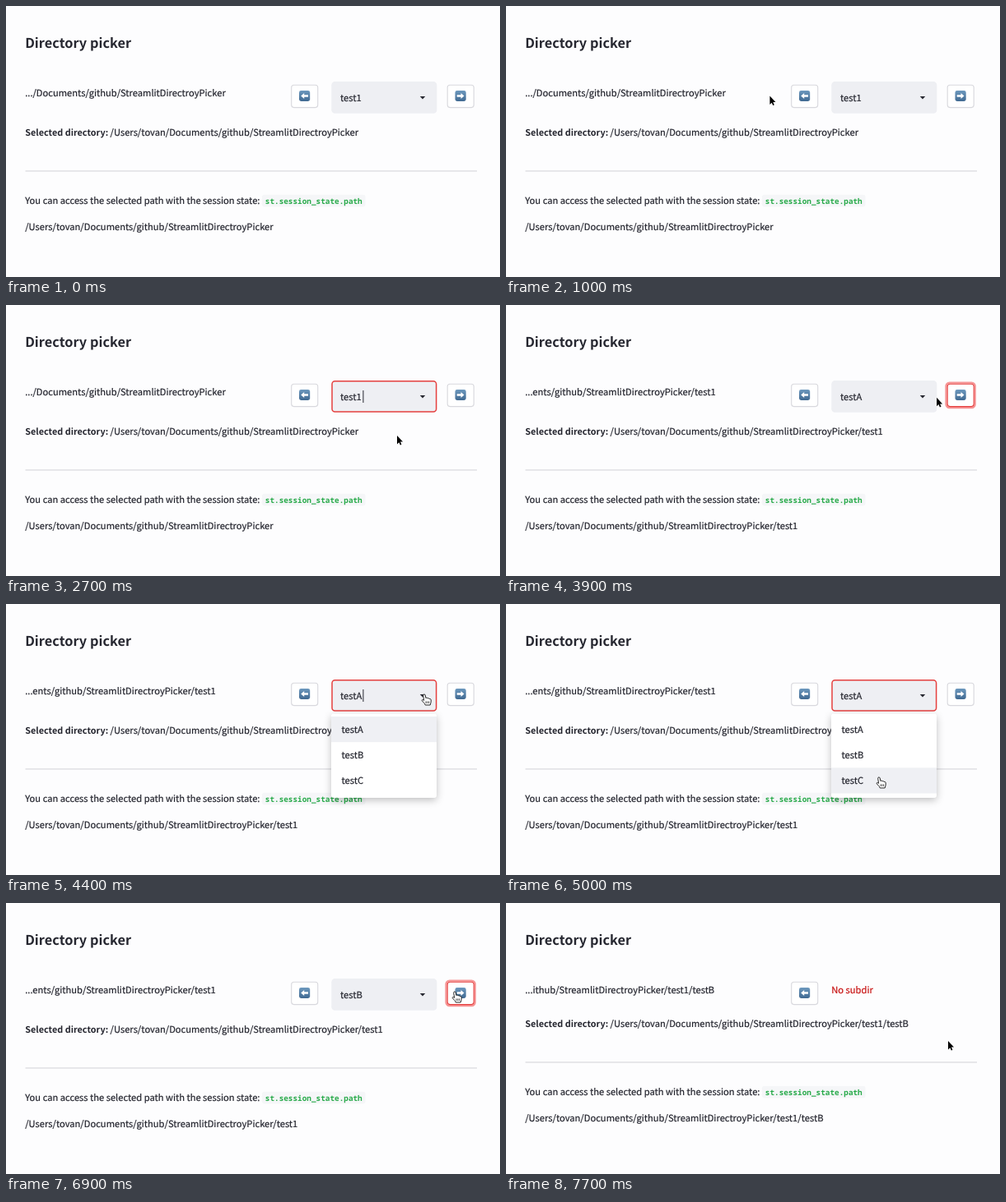
Write an HTML page that moves like this. It is 600 px wide and 330 px high and loops after 8 s.

```html
<!DOCTYPE html>
<html lang="en">
<head>
<meta charset="utf-8">
<title>Directory picker</title>
<style>
  html, body { margin: 0; width: 100%; height: 100%; overflow: hidden; background: #fdfdfe; }
  svg { display: block; width: 100vw; height: 100vh; }
  text {
    font: 11.16px "Noto Sans CJK JP", "Noto Sans CJK SC", "Noto Sans", sans-serif;
    fill: #262730; stroke: #262730; stroke-width: .22px;
    white-space: pre; text-rendering: geometricPrecision;
  }
  .bold, .title, .code { font-weight: 600; stroke: none; }
  .bold { font-size: 10.85px; }
  .title { font-size: 16.35px; }
  .code { font-family: "Noto Sans Mono", "DejaVu Sans Mono", monospace; font-size: 9.37px; fill: #28aa4a; }
  .warn { fill: #c81414; stroke: #c81414; }
  .menu { filter: drop-shadow(0 3px 5px rgba(0, 0, 0, .24)); }
</style>
</head>
<body>
<svg viewBox="0 0 600 330">
  <defs>
    <linearGradient id="key" x2="0" y2="1">
      <stop stop-color="#6c98bd"/><stop offset="1" stop-color="#416a92"/>
    </linearGradient>
  </defs>
  <g id="stage"></g>
</svg>
<script>
const LOOP = 8000, STEP = 100, ROW = 31.2, RED = '#e5403f', INK = '#262730';
const stage = document.getElementById('stage');

const home = '/Users/tovan/Documents/github/StreamlitDirectroyPicker';
const pages = [
  { path: home, items: ['test1', 'test2'] },
  { path: home + '/test1', items: ['testA', 'testB', 'testC'] },
  { path: home + '/test1/testB' }
];

// Pointer moves: start, duration, destination
const next = [551, 118], arrow = [508, 110];
const moves = [
  [1000, 300, next], [1300, 100, arrow],
  [2000, 300, [470, 182]], [2300, 300, [475, 159]],
  [2900, 200, next], [3600, 500, arrow],
  [4500, 500, [453, 211]], [5100, 200, [455, 187]],
  [6300, 300, [545, 108]], [7400, 300, [537, 168]]
];

const within = (v, a, b) => v >= a && v < b;
const clamp = (v, a, b) => Math.max(a, Math.min(b, v));
const text = (x, y, s, cls = '') => `<text x="${x}" y="${y}" class="${cls}">${s}</text>`;
const rect = (x, y, w, h, r, fill, more = '') =>
  `<rect x="${x}" y="${y}" width="${w}" height="${h}" rx="${r}" fill="${fill}" ${more}/>`;

function pointerAt(t) {
  // One sweep around the controls, then the moves in turn
  const angle = Math.PI * (.5 - 4 / 3 * clamp((t - 200) / 600, 0, 1));
  let x = 433 + 130 * Math.cos(angle), y = 157 + 95 * Math.sin(angle);
  for (const [start, span, [toX, toY]] of moves) {
    const k = clamp((t - start) / span, 0, 1), ease = k * k * (3 - 2 * k);
    x += (toX - x) * ease;
    y += (toY - y) * ease;
  }
  return [x, y];
}

function button(x, dir, hover, focus) {
  const edge = hover || focus ? RED : '#d8d8dd';
  const ring = focus ? rect(x - 1.2, 94.6, 35, 30.4, 4, 'none', 'stroke="#f69494" stroke-width="2.4"') : '';
  return ring + rect(x + .4, 96.2, 32, 27.4, 3, '#fff', `stroke="${edge}" stroke-width="1.1"`) +
    `<g transform="translate(${x + 16.3} 109.5) scale(${dir} 1)">` +
    rect(-6.6, -6.4, 13.2, 12.8, 2.4, 'url(#key)') +
    '<path d="M-4.4 0L-.4-3.4V-1.3H4.4V1.3H-.4V3.4Z" fill="#fff"/></g>';
}

function select(value, focus, caret) {
  return rect(396, 92.7, 126.6, 37.4, 3.5, '#eeeff3', `stroke="${focus ? RED : '#eeeff3'}" stroke-width="1.5"`) +
    text(406, 115.6, value) + `<path d="M502.8 110H509.2L506 113.4Z" fill="${INK}"/>` +
    (caret ? rect(433.4, 104, 1, 15, 0, INK) : '');
}

function menu(items, y) {
  const active = clamp(Math.floor((y - 137) / ROW), 0, items.length - 1);
  return `<g class="menu">${rect(395, 133.5, 128, 9 + ROW * items.length, 3, '#fff')}</g>` +
    rect(395, 137 + ROW * active, 128, ROW, 0, '#eff0f4') +
    items.map((s, i) => text(407.5, 157 + ROW * i, s)).join('');
}

function pointer([x, y], hand) {
  const shape = hand
    ? '<path d="M-1.3 1.2C-1.3-.4 .9-.5 1.2 1L1.9 4.6C2.6 3.8 3.9 4 4.1 5C4.9 4.4 6 4.7 6.2 5.6C7.3 5.1 8.2 5.8 8.2 7V9C8.2 10.6 7.4 11.2 7.2 13H1.2C1 11.2-1.6 9.4-2.6 7.8C-3.4 6.5-1.6 6-.4 7.4Z" fill="#fff" stroke="#111" stroke-width=".9"/>' +
      '<path d="M2 8.4V11M3.8 8.4V11M5.6 8.4V11" stroke="#111" stroke-width=".7"/>'
    : '<path d="M0 0V10.4L2.4 8.2L3.8 11.6L5.4 10.9L4 7.6H7Z" stroke="#fff" paint-order="stroke"/>';
  return `<g transform="translate(${x} ${y})">${shape}</g>`;
}

function draw(t) {
  const page = t < 3600 ? 0 : t < 7000 ? 1 : 2;
  const { path, items } = pages[page];
  const open = within(t, 1600, 2500) || within(t, 4400, 5600);
  const focus = within(t, 1600, 3300) || within(t, 4300, 6700);
  const pressed = within(t, 3300, 4300) || within(t, 6700, 7000);
  const at = pointerAt(t);
  const over = (x, y, w, h) => within(at[0], x, x + w) && within(at[1], y, y + h);
  const onLeft = over(346, 96, 33, 28), onRight = items && over(536, 96, 33, 28);
  const onSelect = items && over(395, 92, 122, 39);

  let out = text(23.2, 50.5, 'Directory picker', 'title') +
    text(23.2, 110.4, '...' + path.slice(-42)) + button(346.3, 1, onLeft, false);

  if (items) {
    const blinkFrom = [5600, 4300, 2500, 1600].find(s => t >= s);
    const caret = focus && Math.floor((t - blinkFrom) / 500) % 2 === 0;
    out += button(535.8, -1, onRight, pressed) + select(items[t < 5600 ? 0 : 1], focus, caret);
  } else {
    out += text(395.3, 110.4, 'No subdir', 'warn');
  }

  out += `<g transform="translate(0 ${items ? 0 : -7})">` +
    text(23.2, 157.5, 'Selected directory:', 'bold') + text(126.6, 157.5, path) +
    rect(23.5, 200.2, 548.5, 1.5, 0, '#e0e0e4') +
    text(23.2, 240.6, 'You can access the selected path with the session state:') +
    rect(311, 229.8, 125.6, 14.6, 3, '#f5f6f8') +
    text(314.8, 240.6, 'st.session_state.path', 'code') +
    text(23.2, 272.7, path) + '</g>';

  if (open) out += menu(items, at[1]);
  if (t >= 200) out += pointer(at, open || onLeft || onRight || onSelect);
  stage.innerHTML = out;
}

let last = -1;
function tick(now) {
  const t = Math.floor(now % LOOP / STEP) * STEP;
  if (t !== last) draw(last = t);
  requestAnimationFrame(tick);
}
draw(0);
requestAnimationFrame(tick);
</script>
</body>
</html>
```
